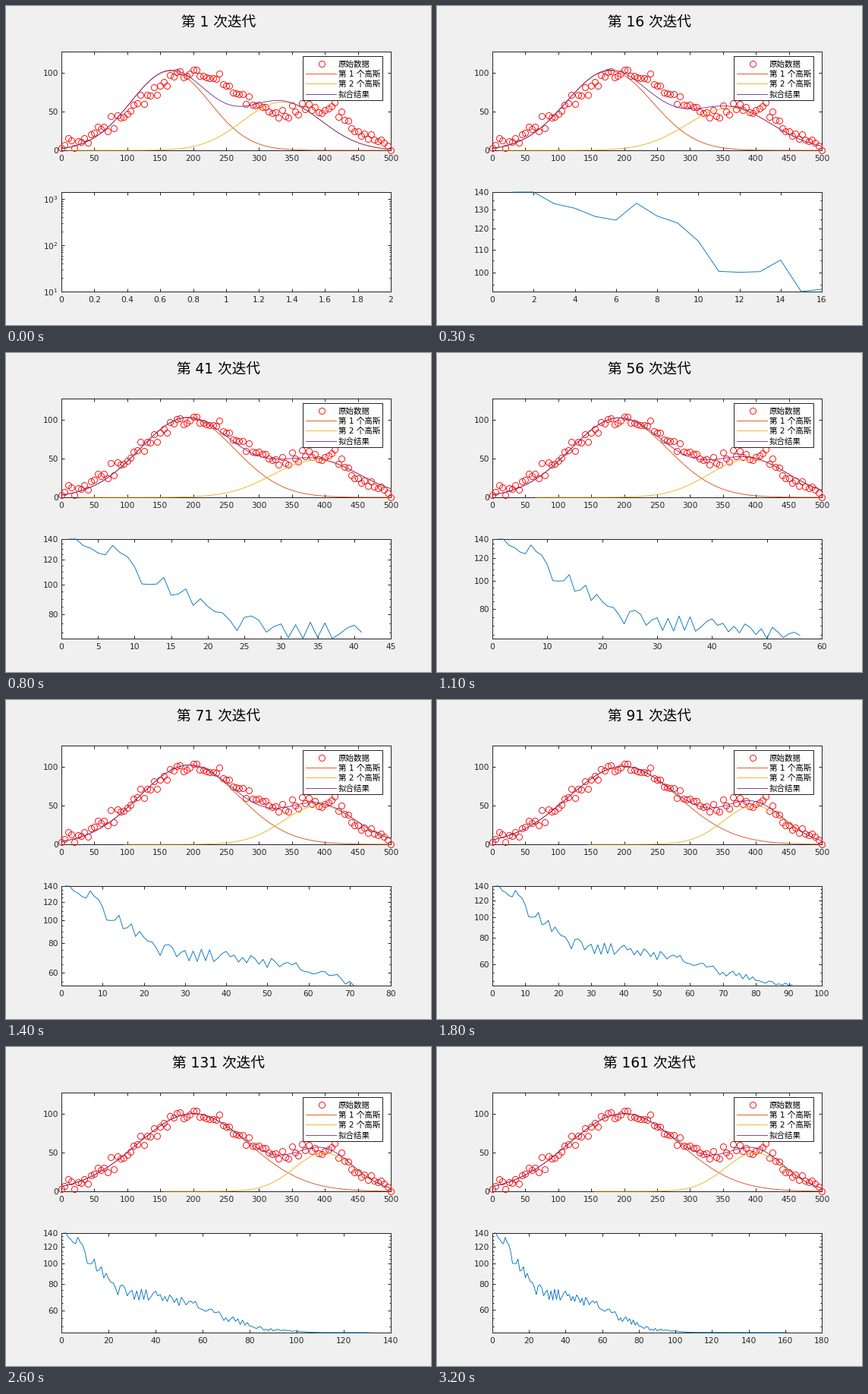
A matplotlib script that plays this animation: 560x420 px, repeating every 3300 ms.

```python
import matplotlib.pyplot as plt
import numpy as np
from matplotlib.animation import FuncAnimation
from matplotlib.patches import Rectangle
from matplotlib.ticker import NullFormatter

W, H, DPI = 560, 420, 100
PX = 72 / DPI
FRAMES, INTERVAL, STEP = 33, 100, 5
LAST = STEP * (FRAMES - 1) + 1
INK = "#262626"
RED, ORANGE, YELLOW, PURPLE, BLUE = "#ff0000", "#d95319", "#edb120", "#7e2f8e", "#0072bd"

plt.rcParams["font.family"] = ["DejaVu Sans", "Noto Sans CJK JP"]

X = np.arange(0, 501, 5)
rng = np.random.default_rng(4)

# Fit at key iterations: height, mean, sigma of each bell
KEYS = [1, 31, 71, 95]
FIT = np.array([
    [102, 165, 60, 62, 335, 60],
    [102.5, 190, 71, 47, 385, 70],
    [102, 194, 75.5, 50, 392, 55],
    [100, 200, 85, 49.5, 399, 45.5],
])


def gauss(height, mean, sigma):
    return height * np.exp(-((X - mean) / sigma) ** 2 / 2)


def visible(y, floor):
    return np.where(y >= floor, y, np.nan)


def bells(n):
    p = [np.interp(n, KEYS, col) for col in FIT.T]
    return gauss(*p[:3]), gauss(*p[3:])


# Samples scatter around the final fit; the last one sits on the axis
samples = sum(bells(LAST)) + rng.normal(0, 4.5, X.size)
samples[-1] = 0

# Error jumps above a falling lower bound, ever less as the search settles
N = np.arange(1, LAST + 1)
bound = np.interp(N, [1, 7, 14, 25, 56, 69, 87, 110, LAST],
                  [140, 113.5, 90.6, 68.6, 61.7, 53.6, 47.8, 47, 46.9])
jump = 0.22 * np.clip(1 - N / 105, 0, 1) * rng.random(N.size) ** 1.5
ERROR = np.minimum(bound * (1 + jump), 140)

fig = plt.figure(figsize=(W / DPI, H / DPI), dpi=DPI, facecolor="#f0f0f0")


def panel(left, top, right, bottom):
    ax = fig.add_axes([left / W, 1 - bottom / H, (right - left) / W, (bottom - top) / H])
    for side in ax.spines.values():
        side.set(linewidth=PX, color=INK)
    ax.tick_params(which="both", direction="in", top=True, right=True,
                   width=PX, color=INK, labelcolor=INK, labelsize=10.67 * PX)
    ax.tick_params(which="major", length=4.4 * PX)
    ax.tick_params(which="minor", length=2.2 * PX)
    ax.tick_params(axis="x", pad=6 * PX)
    ax.tick_params(axis="y", pad=4 * PX)
    return ax


def line(ax, color, x=(), y=()):
    return ax.plot(x, y, color=color, lw=0.9 * PX, clip_on=False, zorder=3)[0]


def circles(ax, x, y):
    ax.plot(x, y, "o", ms=8 * PX, mfc="none", mec=RED, mew=0.9 * PX,
            clip_on=False, zorder=3)


top = panel(73, 60, 507, 190)
top.set(xlim=(0, 500), ylim=(0, 127), xticks=range(0, 501, 50), yticks=(0, 50, 100))
circles(top, X, visible(samples, 0))
bell1, bell2, total = (line(top, c) for c in (ORANGE, YELLOW, PURPLE))

low = panel(73, 245, 507, 376)
low.set_yscale("log")
low.yaxis.set_minor_formatter(NullFormatter())
trace = line(low, BLUE)

# Title and legend live on a pixel grid with y pointing down
page = fig.add_axes([0, 0, 1, 1], zorder=5)
page.set(xlim=(0, W), ylim=(H, 0))
page.axis("off")
title = page.text(280, 21, "", fontsize=18.67 * PX, ha="center", va="center")
page.add_patch(Rectangle((391, 66), 105, 58, fc="white", ec=INK, lw=PX, zorder=2))
circles(page, [415.5], [75.5])
entries = (("原始数据", None), ("第 1 个高斯", ORANGE),
           ("第 2 个高斯", YELLOW), ("拟合结果", PURPLE))
for row, (label, color) in enumerate(entries):
    y = 75.5 + 13.4 * row
    if color:
        line(page, color, (395, 435), (y, y))
    page.text(438, y, label, fontsize=10.5 * PX, va="center_baseline")


def scale_x(n):
    if n == 1:
        step = 0.2
        end = 2
    else:
        step = next(s for s in (1, 2, 5, 10, 20) if n <= 10 * s)
        end = step * np.ceil(n / step)
    ticks = np.arange(0, end + step / 2, step)
    low.set_xticks(ticks, [f"{t:g}" for t in ticks])
    low.set_xlim(0, end)


def scale_y(n):
    if n == 1:
        lo, hi = 10, 1400
        major = [10, 100, 1000]
        names = [rf"$\mathdefault{{10^{{{k}}}}}$" for k in (1, 2, 3)]
        minor = [m * d for d in (10, 100) for m in range(2, 10)]
    else:
        lo, hi = ERROR[:n].min(), 140
        step = 5 if lo > 115 else 10 if lo > 85 else 20
        major = [v for v in range(40, 141, step) if v >= lo]
        names = [str(v) for v in major]
        minor = [v for v in range(45, 140, 5) if v >= lo and v not in major]
    low.set_yticks(major, names)
    low.set_yticks(minor, minor=True)
    low.set_ylim(lo, hi)


def update(i):
    n = STEP * i + 1
    g1, g2 = bells(n)
    bell1.set_data(X, visible(g1, 2e-5))
    bell2.set_data(X, visible(g2, 2e-5))
    total.set_data(X, g1 + g2)
    trace.set_data(N[:n], ERROR[:n])
    scale_x(n)
    scale_y(n)
    title.set_text(f"第 {n} 次迭代")
    return bell1, bell2, total, trace, title


anim = FuncAnimation(fig, update, frames=FRAMES, interval=INTERVAL,
                     repeat=True, repeat_delay=0, blit=False)
plt.show()
```
